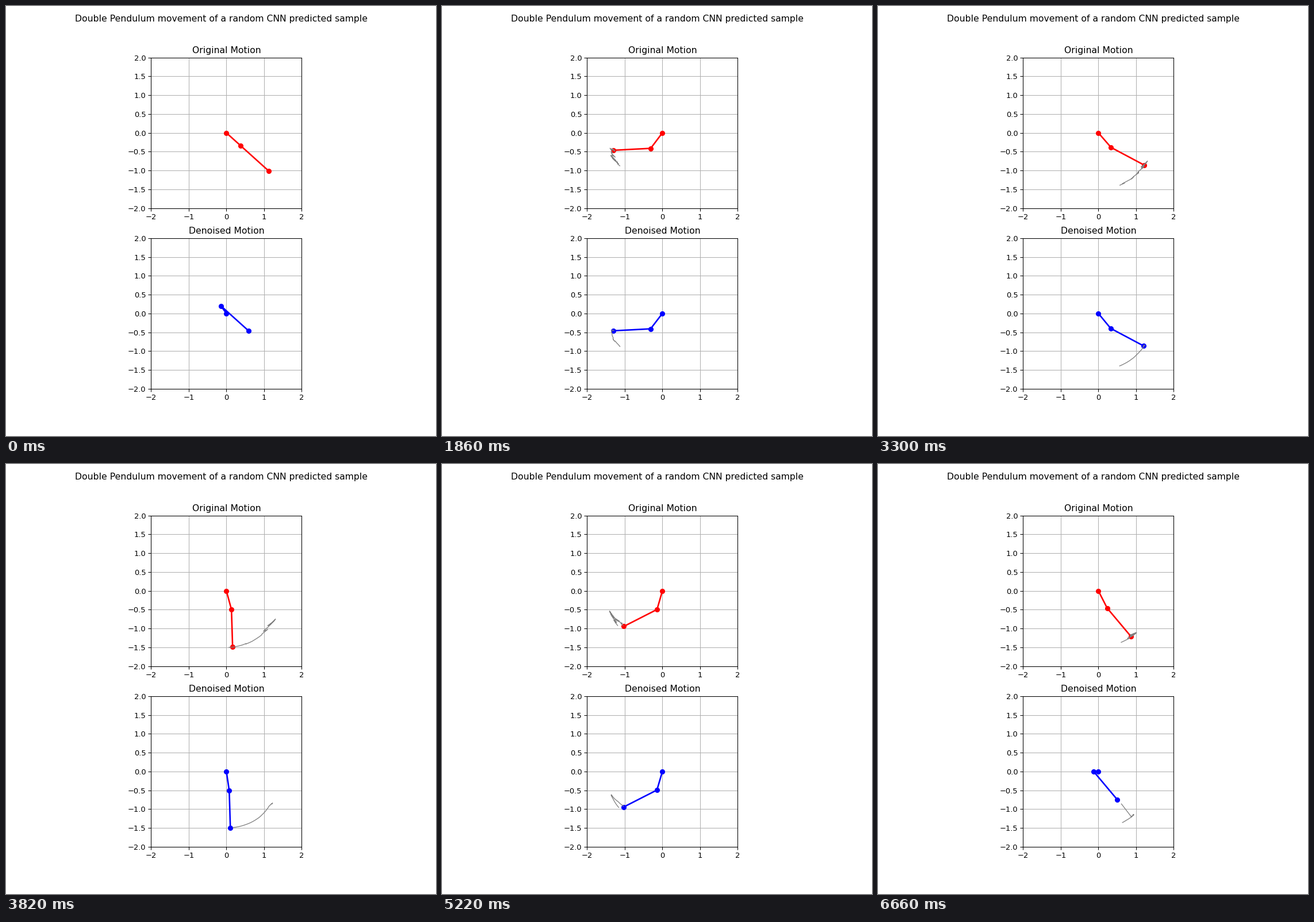
Write a matplotlib script that moves like this. It is 748 by 748 pixels and loops after 6680 ms.

```python
import numpy as np
import matplotlib.pyplot as plt
from matplotlib.animation import FuncAnimation

FRAMES, STEP = 334, 20
TRAIL = 35
L1, L2 = 0.515, 0.99
NOISE = 0.14

# poses the swing passes through: time step, upper and lower angle in degrees
POSES = np.array([
    (0, 48, 48), (9, 45, 55), (34, 1.5, 34), (44, -1.5, -17), (58, -27, -65),
    (72, -45, -70), (93, -37, -87), (115, -8, -36), (130, 23, 22),
    (165, 41, 62), (172, 34, 60), (182, 27, 28), (204, -24, -27),
    (217, -35, -38), (240, -57, -69), (261, -16, -63), (285, 4, -8),
    (304, 22, 41), (333, 27, 40),
])


def hermite(t, tk, yk):
    """Smooth curve through the key values."""
    m = np.gradient(yk, tk)
    k = np.clip(np.searchsorted(tk, t, side="right") - 1, 0, len(tk) - 2)
    h = tk[k + 1] - tk[k]
    s = (t - tk[k]) / h
    return ((1 + 2 * s) * (1 - s) ** 2 * yk[k] + s * (1 - s) ** 2 * h * m[k]
            + s * s * (3 - 2 * s) * yk[k + 1] + s * s * (s - 1) * h * m[k + 1])


def polar(length, angle):
    return np.column_stack((length * np.sin(angle), -length * np.cos(angle)))


def build_motion():
    """Elbow and tip paths, first with noise, then after the filter."""
    steps, upper, lower = POSES.T
    t = np.arange(FRAMES)
    a1 = np.radians(hermite(t, steps, upper))
    a2 = np.radians(hermite(t, steps, lower))

    noise = np.random.default_rng(7).normal(0, NOISE, FRAMES)
    noise[steps.astype(int)] = 0
    smooth = np.convolve(noise, np.ones(7) / 7, mode="same")

    noisy, clean = polar(L1, a1 + noise), polar(L1, a1 + smooth)
    # the filter pulls the elbow away at both ends of the series
    for edge, inner, shift in ((0, 1, (-0.52, 0.55)), (-1, -2, (-0.35, 0.47))):
        clean[edge] += shift
        clean[inner] += 0.75 * np.array(shift)
    rod = polar(L2, a2)
    return [(elbow, elbow + rod) for elbow in (noisy, clean)]


def make_panel(ax, title, color):
    ax.set(xlim=(-2, 2), ylim=(-2, 2), aspect="equal", title=title,
           xticks=np.arange(-2, 3), yticks=np.arange(-2, 2.5, 0.5))
    ax.grid()
    arm, = ax.plot([], [], "o-", color=color, lw=2)
    trail, = ax.plot([], [], "-", color="gray", lw=1)
    return arm, trail


fig, axes = plt.subplots(2, 1, figsize=(8, 8), dpi=93.5)
fig.suptitle("Double Pendulum movement of a random CNN predicted sample")
panels = [make_panel(axes[0], "Original Motion", "red"),
          make_panel(axes[1], "Denoised Motion", "blue")]
motion = build_motion()


def update(i):
    for (arm, trail), (elbow, tip) in zip(panels, motion):
        arm.set_data(*np.transpose([(0, 0), elbow[i], tip[i]]))
        trail.set_data(*tip[max(0, i - TRAIL):i].T)
    return [line for panel in panels for line in panel]


anim = FuncAnimation(fig, update, frames=FRAMES, interval=STEP,
                     repeat=True, repeat_delay=0, blit=False)
plt.show()
```
